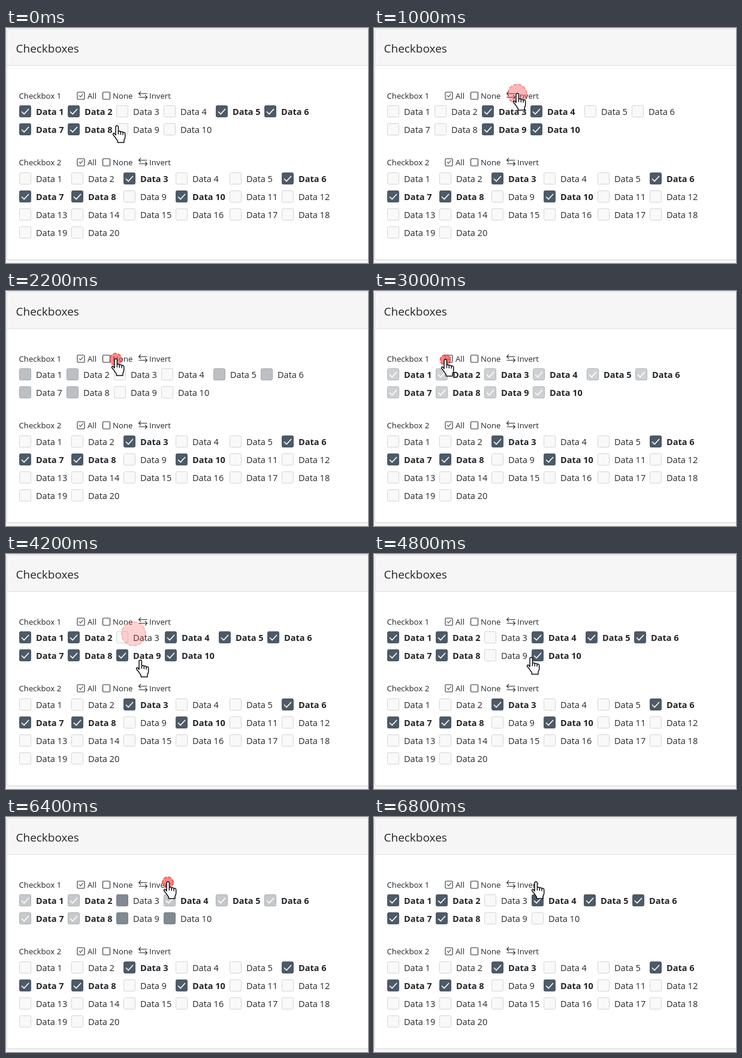
These frames come from a looping animation (604x392 px, 8200 ms). An HTML page:

```html
<!DOCTYPE html>
<html lang="en">
<head>
<meta charset="utf-8">
<title>Checkboxes</title>
<style>
  html, body { margin: 0; width: 100%; height: 100%; overflow: hidden; background: #f6f6f6; }
  svg { display: block; width: 604px; height: 392px; }
  text { font: 14.5px "Open Sans", "Noto Sans", sans-serif; fill: #212529; }
  .title { font-size: 19px; }
  .small { font-size: 13.2px; }
  .on { font-weight: 700; }
  .line { fill: none; stroke: #2b2f33; stroke-width: 1.1; }
  .tick { fill: none; stroke: #fff; stroke-width: 1.6; }
</style>
</head>
<body>
<svg viewBox="0 0 604 392">
  <defs>
    <g id="tools">
      <rect class="line" x="119" y="-11" width="12" height="12" rx="1.5"/>
      <path class="line" d="M122 -5.5l2.3 2.5 4.2-5"/>
      <text class="small" x="136" y="0">All</text>
      <rect class="line" x="161.500" y="-11" width="12" height="12" rx="1.5"/>
      <text class="small" x="178" y="0">None</text>
      <path class="line" d="M235.500 -8.500H221.500M225 -12l-3.500 3.500 3.500 3.500M221.500 -2.500H235.500M232 -6l3.500 3.500 -3.500 3.500"/>
      <text class="small" x="239" y="0">Invert</text>
    </g>
  </defs>
  <rect x="1.500" y="1.500" width="620" height="386" rx="3" fill="#e4e4e4"/>
  <rect x="1.500" y="1.500" width="620" height="385" rx="3" fill="#fff" stroke="#dcdcdc"/>
  <path d="M2 62V4q0-2 2-2H604V62z" fill="#f6f6f6"/>
  <path d="M2 62.500H604" stroke="#dfdfdf"/>
  <text class="title" x="16.500" y="41">Checkboxes</text>
  <text class="small" x="21.500" y="118">Checkbox 1</text>
  <use href="#tools" y="118"/>
  <text class="small" x="21.500" y="229">Checkbox 2</text>
  <use href="#tools" y="229"/>
  <g id="boxes"></g>
  <circle id="ripple" stroke-width="2" stroke-dasharray="6 2.500"/>
  <g id="hand">
    <path transform="translate(-7.500 -2)" fill="#fff" stroke="#111" stroke-width="1.500" stroke-linejoin="round"
      d="M5.500 17V3.200a2.200 2.200 0 0 1 4.400 0V10.500q2-1.300 3.900.6 2.200-1 3.700.9 3.700-.6 3.700 2.800V20q0 2.500-1.800 5.200V29H8.800V26.200Q6.500 23.500 4.600 20.200L1.300 16.300q-.8-2 .9-2.700 1.500-.3 3.300 3.400M9.900 10.500V15.500M13.800 11.500V16M17.500 12.500V16.500"/>
  </g>
</svg>
<script>
const STEP = 200, LOOP = 8200;
const OFF = [249, 249, 249], EDGE = [212, 212, 212], DARK = [77, 90, 103];
const $ = id => document.getElementById(id);
const lerp = (a, b, k) => a + (b - a) * k;
const mix = (a, b, k) => `rgb(${a.map((v, i) => Math.round(lerp(v, b[i], k)))})`;

// cursor stops: step, x, y
const path = [
  [0, 185, 164], [1, 190, 160], [2, 212, 138], [3, 236, 113], [4, 239, 110],
  [8, 239, 110], [10, 183, 114], [12, 183, 114], [13, 119, 115], [16, 119, 115],
  [20, 213, 133], [21, 224, 178], [23, 224, 178], [25, 300, 169], [26, 300, 169],
  [27, 271, 114], [28, 270, 109], [41, 270, 109]
];
// clicks: step, action, first ripple radius, fade progress in that step
const clicks = [
  [4, "invert", 5, 0], [7, "invert", 7, 0], [11, "none", 11, .64], [15, "all", 9.5, .25],
  [20, 3, 9, 0], [22, 9, 10, .3], [25, 10, 10, .3], [28, "invert", 9, 0], [32, "invert", 10, .3]
];
const actions = { invert: v => !v, none: () => false, all: () => true };
const start = [1, 2, 5, 6, 7, 8], fixed = [3, 6, 7, 8, 10];

function node(parent, tag, attrs) {
  const el = document.createElementNS("http://www.w3.org/2000/svg", tag);
  for (const k in attrs) el.setAttribute(k, attrs[k]);
  return parent.appendChild(el);
}

function makeBox(n) {
  const g = node($("boxes"), "g");
  const rect = node(g, "rect", { x: .5, y: .5, width: 19, height: 19, rx: 2 });
  const tick = node(g, "path", { class: "tick", d: "M4 10.5l4.200 4L16 6" });
  const label = node(g, "text", { x: 28, y: 16 });
  label.textContent = "Data " + n;
  return {
    place(x, y) { g.setAttribute("transform", `translate(${x} ${y})`); },
    show(was, is, k) {
      const level = lerp(+was, +is, k);
      rect.setAttribute("fill", mix(OFF, DARK, level));
      rect.setAttribute("stroke", mix(EDGE, DARK, level));
      tick.style.display = (k > 0 ? is : was) ? "" : "none";
      label.setAttribute("class", is ? "on" : "");
    }
  };
}

const first = Array.from({ length: 10 }, (_, i) => makeBox(i + 1));
const cols = [22, 109, 196, 283, 373, 460];
for (let i = 0; i < 20; i++) {
  const box = makeBox(i + 1), on = fixed.includes(i + 1);
  box.place(cols[i % 6], 241 + 30 * Math.floor(i / 6));
  box.show(on, on, 1);
}

function cursorAt(step) {
  const i = path.findIndex(p => p[0] > step);
  const [s0, x0, y0] = path[i - 1], [s1, x1, y1] = path[i];
  const k = (step - s0) / (s1 - s0);
  return [lerp(x0, x1, k), lerp(y0, y1, k)];
}

// each column is as wide as its widest label
function layout(state) {
  let x = 22;
  for (let c = 0; c < 6; c++) {
    first[c].place(x, 129);
    if (c < 4) first[c + 6].place(x, 159);
    let width = state[c] || state[c + 6] ? 81 : 79;
    if (c === 3) width = state[9] ? 90 : 87;
    x += width;
  }
}

function draw(step) {
  let state = first.map((_, i) => start.includes(i + 1)), was = state, k = 1, ripple = null;
  for (const [at, action, r, fade] of clicks) {
    if (at > step) break;
    was = state;
    state = was.map((v, i) => actions[action] ? actions[action](v) : v !== (i + 1 === action));
    k = at === step ? fade : 1;
    ripple = step - at < 2 ? { r: r + 12 * (step - at), pos: cursorAt(at) } : null;
  }
  first.forEach((box, i) => box.show(was[i], state[i], k));
  layout(state);

  const ring = $("ripple");
  ring.style.display = ripple ? "" : "none";
  if (ripple) {
    const alpha = .7 - (ripple.r - 9) * .038;
    ring.setAttribute("cx", ripple.pos[0]);
    ring.setAttribute("cy", ripple.pos[1]);
    ring.setAttribute("r", ripple.r - 1);
    ring.setAttribute("fill", `rgba(252,70,70,${alpha})`);
    ring.setAttribute("stroke", `rgba(232,40,45,${alpha})`);
  }
  $("hand").setAttribute("transform", `translate(${cursorAt(step)})`);
}

let last = -1;
function tick() {
  const step = Math.floor(performance.now() % LOOP / STEP);
  if (step !== last) draw(last = step);
  requestAnimationFrame(tick);
}
tick();
</script>
</body>
</html>
```
